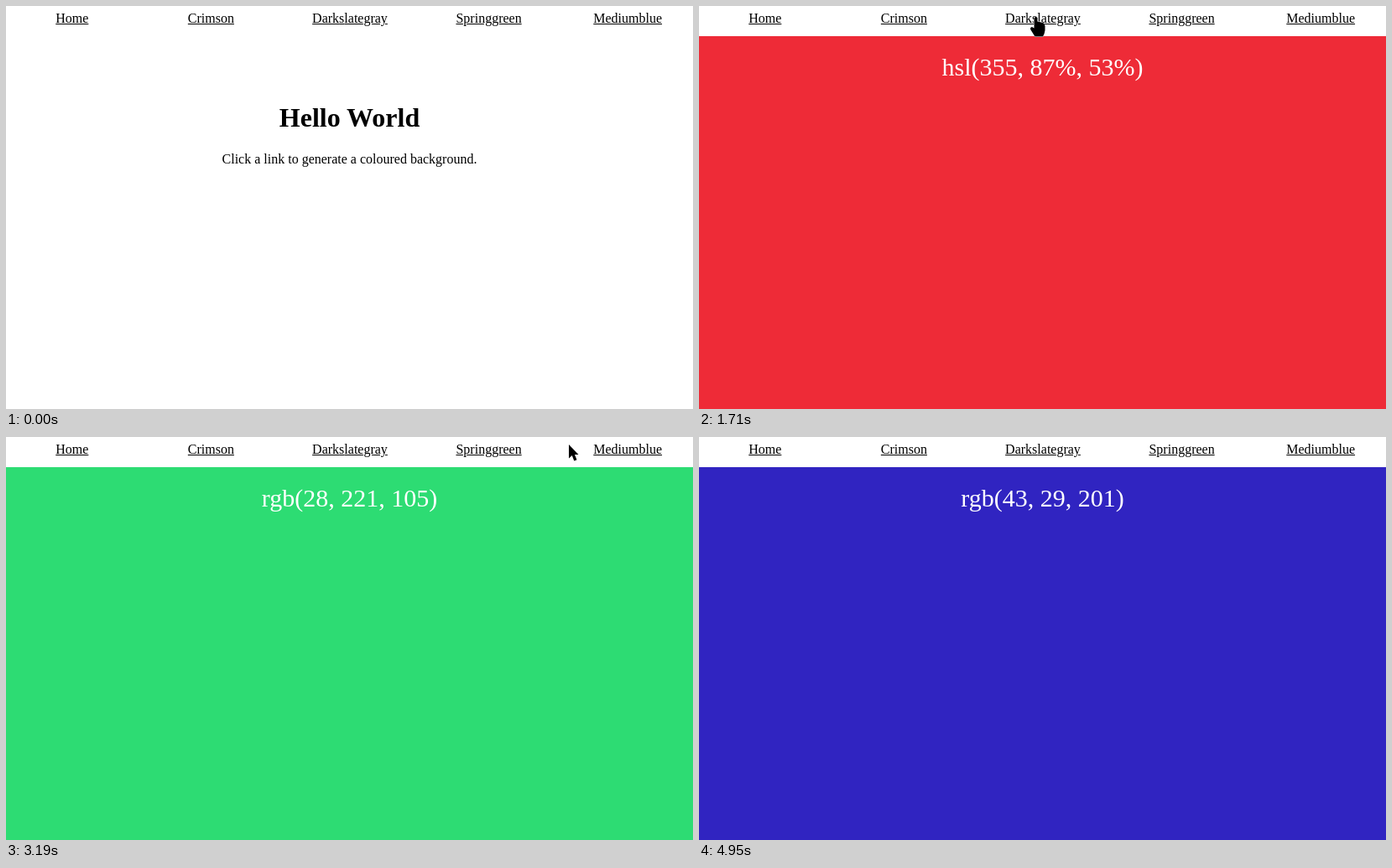
Recreate the animation shown at these times as an HTML page. Size 819 px wide and 481 px high, loop 5020 ms.

```html
<!DOCTYPE html>
<html lang="en">
<head>
<meta charset="utf-8">
<title>Coloured backgrounds</title>
<style>
html, body { margin: 0; width: 100%; height: 100%; overflow: hidden; background: #fff; }
body { position: relative; font: 16px "Liberation Serif", "Times New Roman", serif; color: #000; }
nav { position: absolute; left: -4px; top: 6px; width: 828px; display: flex; }
nav a { flex: 1 1 0; text-align: center; text-decoration: underline; line-height: 18px; }
.picked { background: #3390e0; color: #fff; }
.home, .page { position: absolute; left: 0; top: 36px; width: 819px; height: 445px; text-align: center; }
h1, p { position: absolute; left: 0; width: 100%; margin: 0; }
h1 { top: 79px; font-size: 32px; line-height: 37px; }
p { top: 138px; line-height: 18px; }
.upper, .lower { position: absolute; left: 0; width: 100%; opacity: 0; }
.upper { top: 0; height: 235px; padding-top: 20px; font-size: 30px; line-height: 34px; color: #fff; }
.lower { top: 255px; bottom: 0; }
#cursor { position: absolute; left: 0; top: 0; width: 1px; height: 1px; overflow: visible; }
#cursor path { fill: #000; stroke: #fff; stroke-width: 1; paint-order: stroke; }
</style>
</head>
<body>
<nav><a>Home</a><a>Crimson</a><a>Dark<span id="letter">s</span>lategray</a><a>Springgreen</a><a>Mediumblue</a></nav>
<section class="home">
  <h1>Hello World</h1>
  <p>Click a link to generate a coloured background.</p>
</section>
<svg id="cursor">
  <path id="arrow" d="M0 0V16.5L3.8 13 6.3 19.5 9.5 18.2 7 12H11.5Z"/>
  <path id="hand" d="M-2.5 1.5Q-.5-1 1.5 1V5.5L8 7Q10.5 8 10.5 11V16Q10 20 8 23.5H-1.5L-6.5 15.5Q-8 12.5-5 12L-2.5 13.5Z"/>
</svg>
<script>
const LOOP = 5020, FADE = 230, LAG = 16;
const byId = id => document.getElementById(id);

// Start, end and number of evenly spaced screen refreshes
const bursts = [
  [60, 540, 8], [620, 1130, 8], [1190, 1710, 8], [1790, 2290, 8], [2370, 2890, 8],
  [2970, 3480, 8], [3570, 4070, 8], [4140, 4660, 8], [4720, 4950, 4]
];
const ticks = [0, ...bursts.flatMap(([from, to, n]) =>
  Array.from({ length: n }, (_, i) => from + (to - from) * i / (n - 1)))];

const pages = [
  { at: 1022, color: '#ee2b37', label: 'hsl(355, 87%, 53%)' },
  { at: 1950, color: '#2a2b2c', label: 'hsl(210, 5%, 15%)' },
  { at: 2900, color: '#2ddc73', label: 'rgb(28, 221, 105)' },
  { at: 3847, color: '#3024c1', label: 'rgb(43, 29, 201)' }
];

// Time, x, y, and 1 where the hand shows until the next stop
const stops = [
  [120, 470, 343, 0], [620, 262, 40, 0], [700, 250, 4, 1], [800, 246, 14, 1],
  [1040, 246, 15, 0], [1200, 246, 15, 0], [1420, 330, 3, 0], [1560, 402, 13, 1],
  [2000, 402, 13, 0], [2210, 470, 0, 0], [2440, 560, 12, 1], [2590, 577, 14, 1],
  [2930, 577, 14, 0], [3189, 671, 9, 0], [3450, 702, 3, 0], [3570, 722, 0, 1],
  [3710, 735, 8, 1], [4100, 735, 8, 0], [4215, 750, 90, 0], [4440, 796, 430, 0]
];

function addPage(page) {
  const box = document.createElement('section');
  box.className = 'page';
  [page.upper, page.lower] = ['upper', 'lower'].map(name => {
    const part = document.createElement('div');
    part.className = name;
    part.style.background = page.color;
    box.append(part);
    return part;
  });
  page.upper.textContent = page.label;
  document.body.insertBefore(box, byId('cursor'));
}

const fadeIn = t => Math.min(1, Math.max(0, t / FADE)) ** 1.7;

function moveCursor(t) {
  const next = stops.findIndex(s => s[0] > t);
  const visible = next > 0;
  byId('cursor').style.display = visible ? '' : 'none';
  if (!visible) return;
  const [t0, x0, y0, hand] = stops[next - 1], [t1, x1, y1] = stops[next];
  const k = (t - t0) / (t1 - t0);
  const x = Math.round(x0 + (x1 - x0) * k), y = Math.round(y0 + (y1 - y0) * k);
  byId('cursor').style.transform = `translate(${x}px, ${y}px)`;
  byId('hand').style.display = hand ? '' : 'none';
  byId('arrow').style.display = hand ? 'none' : '';
}

function draw(now) {
  const clock = now % LOOP;
  const t = ticks.findLast(tick => tick <= clock + 8);
  for (const page of pages) {
    page.upper.style.opacity = fadeIn(t - page.at);
    page.lower.style.opacity = fadeIn(t - page.at - LAG);
  }
  byId('letter').className = t >= 1950 && t < 2900 ? 'picked' : '';
  moveCursor(t);
}

pages.forEach(addPage);
const begin = performance.now();
function run() {
  draw(performance.now() - begin);
  requestAnimationFrame(run);
}
run();
</script>
</body>
</html>
```
